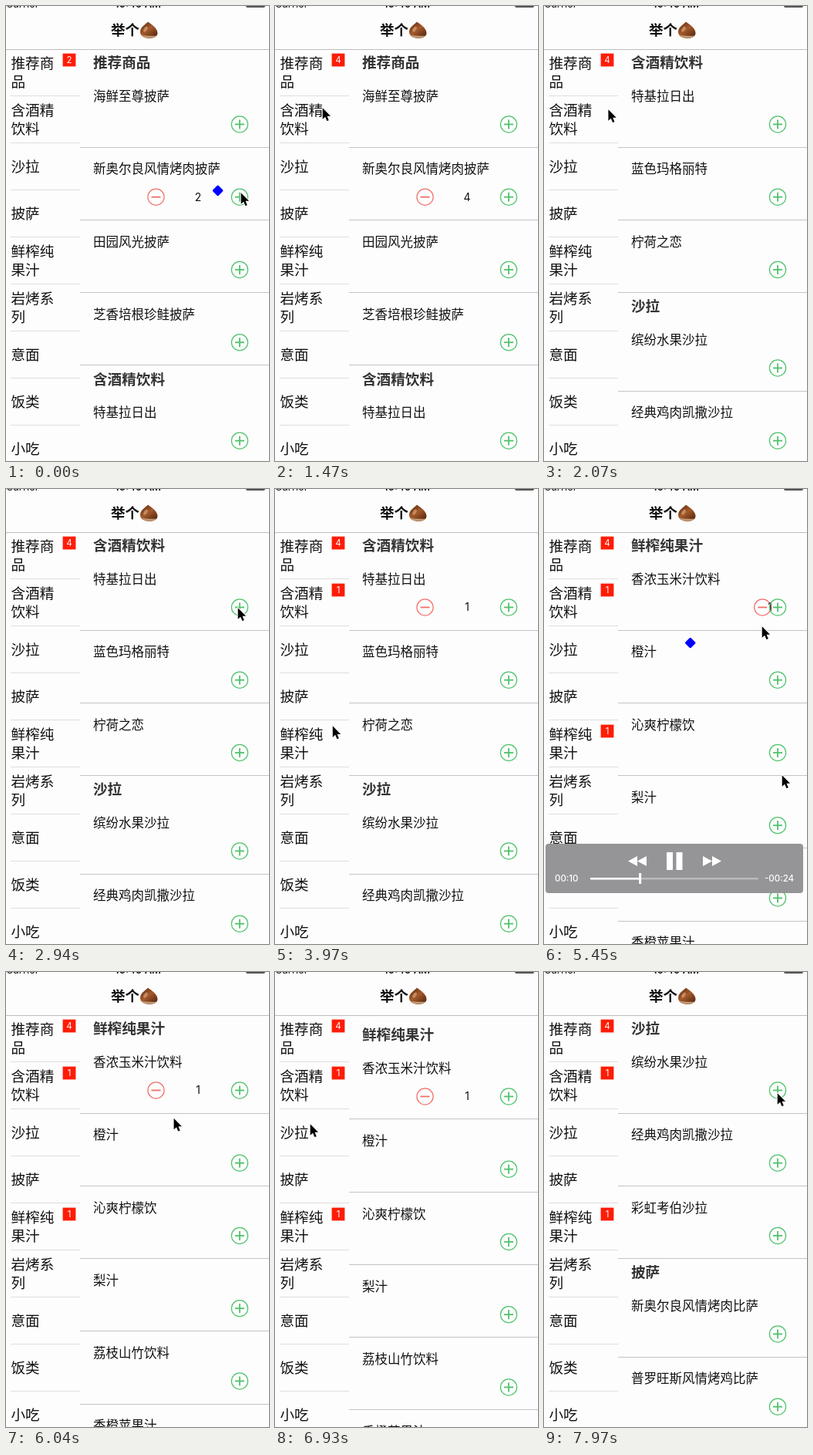
An HTML page with a canvas that plays this animation: 341x590 px, repeating every 8000 ms.

```html
<!DOCTYPE html>
<html lang="zh-CN">
<head>
<meta charset="utf-8">
<style>
html, body { margin: 0; width: 100%; height: 100%; overflow: hidden; background: #fdfdfd; }
canvas { display: block; width: 341px; height: 590px; }
</style>
</head>
<body>
<canvas id="stage"></canvas>
<script>
const W = 341, H = 590, LOOP = 8000, TICK = 147;
const TOP = 56, SIDE = 96, ROW = 61, HEAD = 33.25, CELL = 94.25;
const CJK = '"Noto Sans CJK SC", "Noto Sans CJK", sans-serif';
const LATIN = 'Inter, sans-serif';
const BG = '#fdfdfd', GREEN = '#4fc36c', RED = '#f0706c';

const canvas = document.getElementById('stage');
const c = canvas.getContext('2d');
const dpr = window.devicePixelRatio || 1;
canvas.width = W * dpr;
canvas.height = H * dpr;

const menu = [
  ['推荐商品', '海鲜至尊披萨', '新奥尔良风情烤肉披萨', '田园风光披萨', '芝香培根珍鲑披萨'],
  ['含酒精饮料', '特基拉日出', '蓝色玛格丽特', '柠荷之恋'],
  ['沙拉', '缤纷水果沙拉', '经典鸡肉凯撒沙拉', '彩虹考伯沙拉'],
  ['披萨', '新奥尔良风情烤肉比萨', '普罗旺斯风情烤鸡比萨', '超级至尊披萨', '田园风光披萨',
    '意式香肠披萨', '法式红烩牛肉披萨', '加州风情香烤牛肉比萨', '夏威夷风光披萨'],
  ['鲜榨纯果汁', '香浓玉米汁饮料', '橙汁', '沁爽柠檬饮', '梨汁', '荔枝山竹饮料', '香橙苹果汁']
];
const categories = ['推荐商|品', '含酒精|饮料', '沙拉', '披萨', '鲜榨纯|果汁', '岩烤系|列', '意面', '饭类', '小吃'];

let sum = 0;
const sections = menu.map(([title, ...items]) => {
  const s = { title, items, top: sum };
  sum += HEAD + CELL * items.length;
  s.end = sum;
  return s;
});

// Taps on plus buttons; y is the button's place on screen.
const taps = [
  { at: -2000, sec: 0, item: 1, y: 247.5 },
  { at: -59, sec: 0, item: 1, y: 247.5 },
  { at: 320, sec: 0, item: 1, y: 247.5 },
  { at: 620, sec: 0, item: 1, y: 247.5 },
  { at: 2990, sec: 1, item: 0, y: 153.5 },
  { at: 5203, sec: 4, item: 0, y: 153.5 }
];
const scrolls = [[1600, 1], [4203.4, 4], [6894, 2]];
const pointer = [[0, 304, 241], [880, 304, 241], [1400, 61, 131], [1900, 61, 131], [2750, 300, 153],
  [3400, 300, 153], [4050, 64, 313], [4410, 64, 313], [5100, 300, 156], [5203, 299, 158],
  [5439, 282, 177], [5750, 274, 186], [6600, 45, 196], [7150, 45, 196], [7850, 302, 156]];
const viewer = [[4260, 341, 120], [4410, 331, 139], [5100, 308, 370]];

const clamp = v => Math.max(0, Math.min(1, v));
const mix = (a, b, k) => a + (b - a) * k;
const smooth = v => { v = clamp(v); return v * v * (3 - 2 * v); };

function along(keys, t) {
  const i = keys.findIndex(k => k[0] > t);
  if (i < 0) return keys[keys.length - 1].slice(1);
  if (i === 0) return keys[0].slice(1);
  const [a, b] = [keys[i - 1], keys[i]], k = smooth((t - a[0]) / (b[0] - a[0]));
  return [mix(a[1], b[1], k), mix(a[2], b[2], k)];
}

function text(str, x, mid, size, { color = '#111', weight = 400, font = CJK, align = 'left' } = {}) {
  c.font = `${weight} ${size}px ${font}`;
  c.fillStyle = color;
  c.textAlign = align;
  c.fillText(str, x, mid + size * (font === CJK ? 0.38 : 0.36));
}

function rect(x, y, w, h, color) {
  c.fillStyle = color;
  c.fillRect(x, y, w, h);
}

function poly(points, color) {
  c.beginPath();
  points.forEach(([x, y]) => c.lineTo(x, y));
  c.closePath();
  c.fillStyle = color;
  c.fill();
}

function button(x, y, color, plus) {
  c.beginPath();
  c.arc(x, y, 10.6, 0, 7);
  c.strokeStyle = color;
  c.lineWidth = 1.2;
  c.stroke();
  rect(x - 6, y - 0.9, 12, 1.8, color);
  if (plus) rect(x - 0.9, y - 6, 1.8, 12, color);
}

function scrollAt(t) {
  let y = 0;
  for (const [at, sec] of scrolls) y = mix(y, sections[sec].top, smooth((t - at) / 300));
  return y;
}

function drawCell(name, y, mine, t) {
  text(name, 113, y + 27.6, 16.5);
  const by = y + 64.2;
  if (mine.length) {
    const k = smooth((t - mine[0].at - 100) / 500);
    button(mix(303, 194.5, k), by, RED);
    text(mine.length, mix(303, 249, k), by, 14, { font: LATIN, align: 'center' });
  }
  button(303, by, GREEN, true);
  rect(SIDE, Math.floor(y + CELL - 0.5), W - SIDE, 1, '#c4c4c4');
}

function drawList(t, done) {
  const shift = TOP - scrollAt(t);
  c.save();
  c.beginPath();
  c.rect(SIDE, TOP, W - SIDE, H - TOP);
  c.clip();
  sections.forEach((s, n) => {
    const top = s.top + shift, end = s.end + shift;
    if (end < TOP || top > H) return;
    s.items.forEach((name, i) => {
      const y = top + HEAD + i * CELL;
      if (y + CELL >= TOP && y < H) drawCell(name, y, done.filter(p => p.sec === n && p.item === i), t);
    });
    // Section titles stick to the top until the next one pushes them out.
    const y = Math.max(top, Math.min(TOP, end - HEAD));
    rect(SIDE, y + 0.5, W - SIDE, HEAD - 0.5, BG);
    text(s.title, 113, y + 17.3, 18.6, { weight: 700, color: '#333' });
  });
  c.restore();
}

function drawSide(done) {
  categories.forEach((name, i) => {
    const y = TOP + ROW * i, lines = name.split('|');
    lines.forEach((s, n) => text(s, 6.5, y + 29.8 + (n - (lines.length - 1) / 2) * 24.6, 18.6));
    rect(6, y + 60, SIDE - 6, 1, '#dedede');
    const count = done.filter(p => p.sec === i).length;
    if (!count) return;
    rect(73.6, y + 5.6, 16.8, 16.8, '#ff1c05');
    text(count, 82, y + 14, 11.5, { color: '#fff', font: LATIN, align: 'center' });
  });
}

function chestnut() {
  const g = c.createLinearGradient(178, 22, 192, 41);
  g.addColorStop(0, '#6b3416');
  g.addColorStop(0.45, '#a45a2c');
  g.addColorStop(1, '#5b2a10');
  c.beginPath();
  c.moveTo(184, 20.5);
  c.bezierCurveTo(187, 23, 196.5, 28, 196.5, 35);
  c.bezierCurveTo(196.5, 40, 191, 41.8, 186, 41.8);
  c.bezierCurveTo(179, 41.8, 174, 39, 174, 33.5);
  c.bezierCurveTo(174, 27, 181, 24, 184, 20.5);
  c.fillStyle = g;
  c.fill();
  c.beginPath();
  c.moveTo(175.5, 37.5);
  c.quadraticCurveTo(185, 39.5, 195.5, 38.5);
  c.bezierCurveTo(192, 42.8, 179, 42.8, 175.5, 37.5);
  c.fillStyle = '#c49a74';
  c.fill();
  c.beginPath();
  c.ellipse(181, 30, 2, 4, 0.6, 0, 7);
  c.fillStyle = 'rgba(235,185,140,.55)';
  c.fill();
}

function drawNav() {
  rect(0, TOP, W, 1, '#bdbdbd');
  text('Carrier', 0, -2.5, 13, { font: LATIN });
  text('10:40 AM', 171, -2.5, 13, { font: LATIN, weight: 600, align: 'center' });
  c.beginPath();
  c.roundRect(311, -8, 25, 10, 2);
  c.fillStyle = '#555';
  c.fill();
  text('举个', 136, 31, 18.5, { weight: 700 });
  chestnut();
}

function drawBall({ at, y }, t) {
  const k = (t - at) / 600;
  if (k < 0 || k >= 1) return;
  const curve = (a, b, d) => a * (1 - k) ** 2 + 2 * b * k * (1 - k) + d * k * k;
  c.save();
  c.translate(curve(303, 159, 15), curve(y, y * 0.766 - 6, 580));
  c.rotate(Math.PI / 4);
  c.beginPath();
  c.roundRect(-5.2, -5.2, 10.4, 10.4, 1.5);
  c.fillStyle = '#0000fe';
  c.fill();
  c.restore();
}

function drawPointer([x, y]) {
  c.save();
  c.translate(x + 0.7, y + 1.2);
  c.scale(0.94, 0.94);
  c.lineJoin = 'round';
  c.lineWidth = 2;
  c.strokeStyle = '#fff';
  c.beginPath();
  [[0, 0], [0, 15.5], [3.6, 12.2], [6, 18], [8.6, 17], [6.2, 11.3], [11, 11.3]].forEach(p => c.lineTo(...p));
  c.closePath();
  c.stroke();
  c.fillStyle = '#000';
  c.fill();
  c.restore();
}

function drawPlayer(t) {
  const alpha = clamp((t - 4240) / 200) * clamp((5900 - t) / 250);
  if (!alpha) return;
  const sec = 9.05 + (t - 4410) / 1000, pad = n => String(n).padStart(2, '0');
  const knob = 60 + sec * 218 / 34, label = { color: '#fff', font: LATIN, weight: 500 };
  c.save();
  c.globalAlpha = alpha;
  c.beginPath();
  c.roundRect(2, 460, 334, 64, 4);
  c.fillStyle = '#959497';
  c.fill();
  for (const x of [109, 121]) poly([[x, 482.5], [x + 12, 476], [x + 12, 489]], '#fff');
  for (const x of [206, 218]) poly([[x, 476], [x + 12, 482.5], [x, 489]], '#fff');
  rect(159, 471, 8, 23, '#fff');
  rect(171.5, 471, 8, 23, '#fff');
  rect(60, 504, 218, 2.5, '#b9b8ba');
  rect(60, 504, knob - 60, 2.5, '#fff');
  rect(knob - 1.5, 498, 3, 14, '#fff');
  text('00:' + pad(Math.floor(sec)), 14, 505, 11.5, label);
  text('-00:' + pad(34 - Math.floor(sec)), 286, 505, 11.5, label);
  c.restore();
}

function draw(t) {
  const done = taps.filter(p => p.at <= t);
  c.setTransform(dpr, 0, 0, dpr, 0, 0);
  rect(0, 0, W, H, BG);
  drawList(t, done);
  drawSide(done);
  drawNav();
  done.forEach(p => drawBall(p, t));
  drawPointer(along(pointer, t));
  drawPlayer(t);
  if (t > 4260 && t < 5850) drawPointer(along(viewer, t));
}

const start = performance.now();
function frame() {
  const t = (performance.now() - start) % LOOP;
  draw(Math.floor(t / TICK) * TICK);
  requestAnimationFrame(frame);
}
frame();
</script>
</body>
</html>
```
